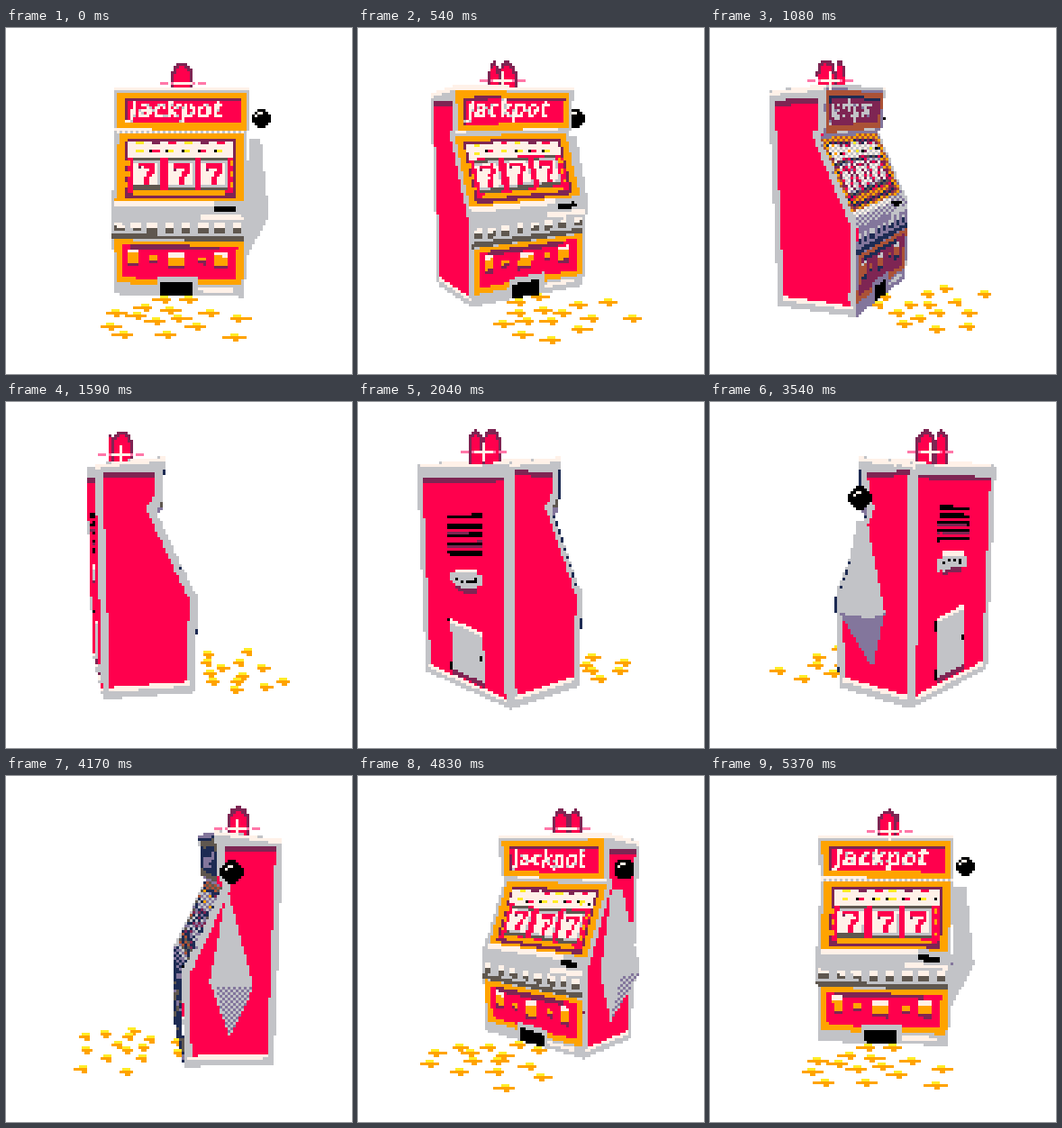
Animation of 384x384 px, one loop 5400 ms. Source, as an HTML page with a canvas:

```html
<!DOCTYPE html>
<html>
<head>
<meta charset="utf-8">
<style>
html, body { margin: 0; width: 100%; height: 100%; overflow: hidden; background: #fff; }
canvas { display: block; width: 100vmin; height: 100vmin; image-rendering: pixelated; }
</style>
</head>
<body>
<canvas id="stage" width="128" height="128"></canvas>
<script>
const SIZE = 128, LOOP = 5400, STEP = 30, START = -4 * Math.PI / 180;
const colors = ['000000', '1d2b53', '7e2553', '5f574f', 'ab5236', 'c2c3c7', 'fff1e8', 'ff004d', 'ffa300', 'ffec27', '83769c', 'ff77a8'];
const rgb = colors.map(h => [0, 2, 4].map(i => parseInt(h.substr(i, 2), 16)));
const [BLACK, NAVY, WINE, BROWN, RUST, SILVER, CREAM, RED, ORANGE, YELLOW, LILAC, PINK] = colors.keys();
const darker = [BLACK, NAVY, NAVY, NAVY, BROWN, LILAC, SILVER, WINE, RUST, ORANGE, NAVY, WINE];

const ctx = document.getElementById('stage').getContext('2d');
const image = ctx.createImageData(SIZE, SIZE);
const depth = new Float32Array(SIZE * SIZE);
let cos, sin;

// Textures are drawn with canvas calls, then snapped to the inks they use
function texture(w, h, draw) {
  const cv = document.createElement('canvas');
  cv.width = w; cv.height = h;
  const g = cv.getContext('2d'), used = new Set(), p = [];
  const ink = c => {
    used.add(c);
    g.fillStyle = g.strokeStyle = '#' + colors[c];
  };
  draw(g, (c, x, y, rw, rh) => { ink(c); g.fillRect(x, y, rw, rh); }, ink);
  const d = g.getImageData(0, 0, w, h).data;
  const gap = (c, i) => Math.hypot(...rgb[c].map((v, k) => v - d[i + k]));
  for (let i = 0; i < d.length; i += 4) {
    p.push(d[i + 3] < 128 ? -1 : [...used].reduce((a, b) => gap(b, i) < gap(a, i) ? b : a));
  }
  return { w, h, p };
}
const solid = c => ({ w: 1, h: 1, p: [c] });

const front = texture(150, 228, (g, box, ink) => {
  g.translate(-120, -69);
  box(SILVER, 120, 69, 150, 228);
  box(CREAM, 120, 69, 150, 4);
  // marquee
  box(ORANGE, 123, 75, 144, 39);
  box(WINE, 131, 81, 130, 27);
  box(RED, 134, 84, 127, 24);
  ink(CREAM);
  g.font = 'italic bold 25px "DejaVu Sans", sans-serif';
  g.fillText('Jackpot', 137, 102);
  box(CREAM, 120, 114, 150, 3);
  // reels
  box(ORANGE, 123, 117, 144, 75);
  box(WINE, 132, 123, 126, 66);
  box(RED, 135, 126, 120, 57);
  box(CREAM, 135, 126, 120, 17);
  for (let i = 0; i < 6; i++) {
    box([YELLOW, WINE, RED][i % 3], 144 + i * 18, 126, 9, 3);
    box([YELLOW, BLACK, RED][(i + i * i) % 3], 144 + i * 18, 135, 7, 3);
    box(BLACK, 159 + i * 18, 135, 3, 3);
  }
  for (const x of [141, 180, 217]) {
    box(BROWN, x, 144, 30, 35);
    box(SILVER, x, 147, 30, 28);
    box(CREAM, x, 149, 28, 24);
    box(RED, x + 6, 150, 18, 4);
    box(WINE, x + 6, 154, 3, 3);
    box(RED, x + 19, 154, 5, 6);
    box(RED, x + 15, 159, 6, 6);
    box(RED, x + 12, 164, 6, 9);
  }
  for (const x of [133, 250]) for (const y of [147, 159, 171]) box(ORANGE, x, y, 4, 5);
  box(ORANGE, 141, 180, 105, 5);
  // ledge and buttons
  box(CREAM, 123, 192, 111, 6);
  box(BLACK, 234, 198, 24, 6);
  box(CREAM, 219, 207, 48, 6);
  for (let i = 0; i < 8; i++) {
    box(CREAM, 123 + i * 18.7, 216, 10, 6);
    box(BROWN, 123 + i * 18.7, 222, 10, 6);
  }
  box(BROWN, 120, 231, 147, 6);
  // lower panel
  box(ORANGE, 123, 238, 144, 47);
  box(RED, 131, 243, 129, 36);
  box(WINE, 140, 243, 100, 5);
  for (const [x, y, w] of [[138, 247, 12], [183, 250, 18], [234, 249, 15]]) {
    box(CREAM, x, y, w, 5);
    box(ORANGE, x, y + 5, w, 10);
    box(WINE, x, y + 15, w, 4);
  }
  for (const x of [161, 216]) {
    box(ORANGE, x, 255, 9, 5);
    box(WINE, x, 260, 9, 3);
  }
  box(SILVER, 171, 276, 45, 21);
  box(BLACK, 174, 282, 36, 15);
  box(CREAM, 216, 288, 42, 4);
});

const back = texture(148, 207, (g, box) => {
  box(SILVER, 0, 0, 148, 207);
  box(RED, 9, 10, 130, 188);
  box(WINE, 9, 10, 130, 4);
  for (let i = 0; i < 5; i++) box(BLACK, 48, 41 + i * 7.8, 57, 4);
  box(WINE, 58, 103, 38, 5);
  box(SILVER, 48, 92, 57, 10);
  box(SILVER, 58, 88, 38, 16);
  box(CREAM, 58, 87, 38, 4);
  for (let i = 0; i < 4; i++) box(BLACK, 58 + i * 10, 96, 7, 3);
  box(BLACK, 44, 142, 5, 10);
  box(BLACK, 44, 184, 5, 10);
  box(WINE, 48, 192, 56, 5);
  box(SILVER, 48, 144, 56, 48);
  box(CREAM, 46, 141, 58, 4);
  box(BLACK, 96, 167, 5, 5);
  box(CREAM, 6, 198, 136, 4);
});

const profile = [[-90, 207], [-28, 214], [-31, 170], [-36, 166], [-2, 94], [2, 88], [0, 0], [-90, 0]];
const side = texture(92, 216, (g, box, ink) => {
  g.beginPath();
  profile.forEach(([z, y]) => g.lineTo(z + 90, 216 - y));
  g.closePath();
  g.clip();
  box(RED, 0, 0, 92, 216);
  box(WINE, 0, 15, 92, 6);
  ink(SILVER);
  g.lineWidth = 14;
  g.stroke();
  box(SILVER, 0, 0, 92, 16);
  box(CREAM, 6, 206, 80, 4);
  ink(CREAM);
  g.lineWidth = 8;
  g.beginPath();
  g.moveTo(0, 9);
  g.lineTo(62, 2);
  g.stroke();
});

const dome = texture(24, 30, (g, box, ink) => {
  ink(WINE);
  g.beginPath();
  g.ellipse(12, 14, 12, 14, 0, Math.PI, 0);
  g.rect(0, 14, 24, 16);
  g.fill();
  ink(RED);
  g.beginPath();
  g.ellipse(12, 16, 9, 12, 0, Math.PI, 0);
  g.rect(3, 16, 18, 14);
  g.fill();
});

function put(x, y, d, c, light = 1) {
  x = Math.floor(x); y = Math.floor(y);
  const i = y * SIZE + x;
  if (c < 0 || x < 0 || y < 0 || x >= SIZE || y >= SIZE || d > depth[i]) return;
  depth[i] = d;
  let shade = light > .5 ? 0 : light > .4 ? .5 : light > .2 ? 1 : light > .1 ? 1.5 : 2;
  if (shade % 1) shade += (x + y) & 1 ? -.5 : .5;
  while (shade-- > 0) c = darker[c];
  image.data.set(rgb[c], i * 4);
}

function project([X, Y, Z]) {
  const x = X * cos + Z * sin, z = Z * cos - X * sin;
  const d = (670 - z - .256 * Y) / 670;
  return { x: (192 + x / d) / 3, y: (297 - (Y - .32 * z) / d) / 3, d };
}

// Plain affine texture mapping
function triangle(a, b, c, tex, light) {
  const abx = b.x - a.x, aby = b.y - a.y, acx = c.x - a.x, acy = c.y - a.y;
  const area = abx * acy - aby * acx;
  if (!area) return;
  const xs = [a.x, b.x, c.x], ys = [a.y, b.y, c.y];
  const clamp = (v, n) => Math.min(n - 1, Math.max(0, Math.floor(v)));
  for (let y = Math.floor(Math.min(...ys)); y <= Math.max(...ys); y++) {
    for (let x = Math.floor(Math.min(...xs)); x <= Math.max(...xs); x++) {
      const px = x + .5 - a.x, py = y + .5 - a.y;
      const wb = (px * acy - py * acx) / area, wc = (abx * py - aby * px) / area, wa = 1 - wb - wc;
      if (wa < 0 || wb < 0 || wc < 0) continue;
      const mix = k => wa * a[k] + wb * b[k] + wc * c[k];
      put(x, y, mix('d'), tex.p[clamp(mix('v'), tex.h) * tex.w + clamp(mix('u'), tex.w)], light);
    }
  }
}

function quad(points, tex, light = 1, v0 = 0, v1 = tex.h) {
  const p = points.map(project);
  p.forEach((q, i) => { q.u = i % 3 ? tex.w : 0; q.v = i < 2 ? v0 : v1; });
  triangle(p[0], p[1], p[2], tex, light);
  if (p[3]) triangle(p[0], p[2], p[3], tex, light);
}

// Front strips: texture row range, then Z and Y of the top and bottom edges
const strips = [
  [0, 46, -28, 214, -31, 170],
  [46, 48, -31, 170, -36, 166],
  [48, 126, -36, 166, -4, 97],
  [126, 138, -4, 97, 3, 87],
  [138, 171, 3, 87, 2, 58],
  [171, 228, 2, 58, 0, 0]
];

// Coins as first seen on screen, moved back to the floor
const FLOOR = -5;
const coins = [
  [174, 302], [205, 302], [154, 311], [123, 317], [145, 320], [184, 314], [226, 317], [195, 321],
  [166, 326], [118, 330], [213, 331], [261, 323], [131, 341], [180, 339], [255, 342]
].map(([x, y]) => {
  const q = (y - 297 + FLOOR) / .32, z = 670 * q / (670 + q), fx = (x - 192) * (670 - z) / 670;
  const c = Math.cos(START), s = Math.sin(START);
  return [c * fx - s * z, FLOOR, s * fx + c * z];
});

function cabinet() {
  const W = 72.5;
  for (const [v0, v1, z0, y0, z1, y1] of strips) {
    const len = Math.hypot(z1 - z0, y1 - y0);
    const light = .97 * (y0 - y1) / len * cos + .25 * (z1 - z0) / len;
    quad([[-W, y0, z0], [W, y0, z0], [W, y1, z1], [-W, y1, z1]], front, light, v0, v1);
  }
  for (const x of [-W, W]) quad([[x, 216, -90], [x, 216, 2], [x, 0, 2], [x, 0, -90]], side);
  quad([[W, 207, -90], [-W, 207, -90], [-W, 0, -90], [W, 0, -90]], back);
  quad([[-W, 207, -90], [W, 207, -90], [W, 214, -28], [-W, 214, -28]], solid(CREAM));
}

function lever() {
  const top = [87, 162, -39], base = [74, 162, -39], tip = [74, 29, -45];
  const r1 = [98, 82, -26], r2 = [98, 82, -62], b1 = [74, 82, -24], b2 = [74, 82, -60];
  const silver = solid(SILVER), under = .42 + .06 * cos;
  quad([top, r1, r2], silver);
  quad([base, top, r1, b1], silver);
  quad([base, top, r2, b2], silver);
  quad([r1, r2, tip], silver, under);
  quad([r1, b1, tip], silver);
  quad([r2, b2, tip], silver, under);
  const p = project([86, 181, -42]), r = 10 / 3 / p.d;
  for (let y = -4; y <= 4; y++) for (let x = -4; x <= 4; x++) {
    if (Math.hypot(x, y) > r) continue;
    const shine = y === -2 && (x === -1 || x === 0) || x === -2 && y === -1;
    put(p.x + x, p.y + y, p.d - .02, shine ? CREAM : BLACK);
  }
}

// A four-sided lamp with a dome on every face
function siren(n, angle) {
  const R = 11;
  for (let k = 0; k < 4; k++) {
    const turn = k * Math.PI / 2, c = Math.cos(turn), s = Math.sin(turn);
    if (Math.cos(angle + turn) < .1) continue;
    const corner = (x, y) => [x * c + R * s, y, -59 + R * c - x * s];
    quad([corner(-R, 239), corner(R, 239), corner(R, 208), corner(-R, 208)], dome);
  }
  const p = project([0, 219, -59]), near = p.d - .15;
  for (let x = -8; x <= 8; x++) {
    if (Math.abs(x) !== 5) put(p.x + x, p.y, near, Math.abs(x) < 4 ? CREAM : PINK);
  }
  if (n % 20 > 1) for (let y = -3; y <= 3; y++) put(p.x, p.y + y, near, CREAM);
}

function coin(pos, i) {
  const p = project(pos), w = (2 + 1.6 * Math.abs(cos)) / p.d, lean = i % 2;
  for (let x = -w; x < w - .5; x++) put(p.x + x, p.y, p.d, ORANGE);
  for (let x = -1; x <= 1; x++) put(p.x + x - lean, p.y - 1, p.d, YELLOW);
  for (let x = 0; x < 2; x++) put(p.x + x - lean, p.y + 1, p.d, ORANGE);
}

function frame(now) {
  const n = Math.floor(now % LOOP / STEP);
  const angle = START + n * STEP / LOOP * 2 * Math.PI;
  cos = Math.cos(angle);
  sin = Math.sin(angle);
  image.data.fill(255);
  depth.fill(Infinity);
  cabinet();
  lever();
  siren(n, angle);
  coins.forEach(coin);
  ctx.putImageData(image, 0, 0);
}

const begin = performance.now();
(function tick() {
  frame(performance.now() - begin);
  requestAnimationFrame(tick);
})();
</script>
</body>
</html>
```
